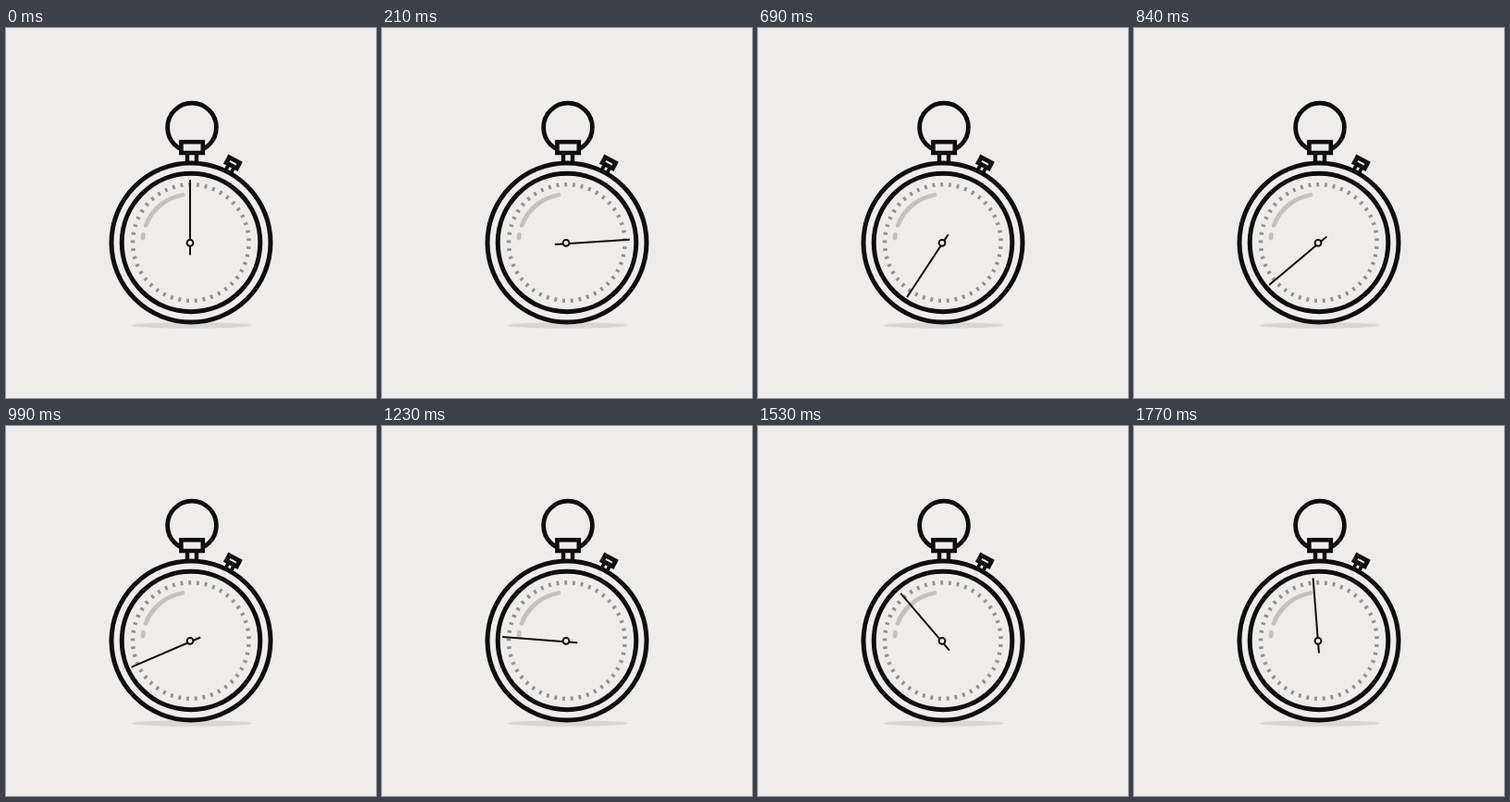
These frames come from a looping animation (400 px wide and 400 px high, 1800 ms). An HTML page with a canvas:

```html
<!DOCTYPE html>
<html lang="en">
<head>
<meta charset="utf-8">
<title>Stopwatch</title>
<style>
  html, body { margin: 0; width: 100%; height: 100%; overflow: hidden; background: #eeedeb; }
  canvas { display: block; width: 400px; height: 400px; }
</style>
</head>
<body>
<canvas id="stage" width="400" height="400"></canvas>
<script>
const ctx = document.getElementById('stage').getContext('2d');
const LOOP = 1800, STEP = 30;
const PAPER = '#eeedeb', INK = '#0e0e0f', TICK = '#929190', GLOSS = '#c3c2c1', SHADE = '#d8d7d5';
const RAD = Math.PI / 180;

// time in ms, hand angle in degrees
const KEYS = [[0, 0], [210, 86.3], [390, 180], [1200, 270], [1800, 360]];

function handAngle(t) {
  const i = KEYS.findIndex(k => k[0] > t);
  const [t0, a0] = KEYS[i - 1], [t1, a1] = KEYS[i];
  return a0 + (a1 - a0) * (t - t0) / (t1 - t0);
}

function pen(color, width, cap = 'butt') {
  ctx.strokeStyle = color;
  ctx.lineWidth = width;
  ctx.lineCap = cap;
}

function arc(x, y, r, from = 0, to = 360) {
  ctx.beginPath();
  ctx.arc(x, y, r, from * RAD, to * RAD);
  ctx.stroke();
}

function line(x1, y1, x2, y2) {
  ctx.beginPath();
  ctx.moveTo(x1, y1);
  ctx.lineTo(x2, y2);
  ctx.stroke();
}

function box(x, y, w, h) {
  ctx.fillStyle = PAPER;
  ctx.fillRect(x, y, w, h);
  ctx.strokeRect(x, y, w, h);
}

function rotated(x, y, deg, paint) {
  ctx.save();
  ctx.translate(x, y);
  ctx.rotate(deg * RAD);
  paint();
  ctx.restore();
}

function drawCrown() {
  pen(INK, 4.8);
  arc(201, 107.5, 26.4);
  pen(INK, 4.4);
  line(196, 136, 196, 147);
  line(206, 136, 206, 147);
  pen(INK, 4.6);
  box(189.4, 123.2, 23.4, 11.8);
}

function drawButton() {
  rotated(245.4, 145.7, 28, () => {
    pen(INK, 3.8);
    line(-3.3, 3, -3.3, 13);
    line(3.3, 3, 3.3, 13);
    pen(INK, 4.8);
    box(-6.4, -3.4, 12.8, 6.8);
  });
}

function drawBody() {
  ctx.fillStyle = SHADE;
  ctx.beginPath();
  ctx.ellipse(200.5, 321.5, 65, 3.2, 0, 0, Math.PI * 2);
  ctx.fill();

  drawCrown();
  drawButton();

  ctx.fillStyle = PAPER;
  pen(INK, 5);
  ctx.beginPath();
  ctx.arc(200, 232, 86, 0, Math.PI * 2);
  ctx.fill();
  ctx.stroke();
  arc(200, 232, 74.8);
}

function drawDial() {
  pen(TICK, 2.8);
  for (let i = 0; i < 45; i++) {
    rotated(199.8, 232, i * 8 - 1, () => line(0, -65, 0, -60.6));
  }
  pen(GLOSS, 4.8, 'round');
  arc(200, 232, 52.3, 201, 260);
  arc(200, 232, 52.3, 185.5, 189.8);
}

function drawHand(deg) {
  pen(INK, 2);
  rotated(199, 233.3, deg, () => line(0, -69, 0, 12.2));
  ctx.fillStyle = PAPER;
  ctx.beginPath();
  ctx.arc(199, 232.3, 3.4, 0, Math.PI * 2);
  ctx.fill();
  ctx.stroke();
}

function frame(now) {
  const t = Math.floor((now - start) % LOOP / STEP) * STEP;
  ctx.fillStyle = PAPER;
  ctx.fillRect(0, 0, 400, 400);
  drawBody();
  drawDial();
  drawHand(handAngle(Math.max(0, t)));
  requestAnimationFrame(frame);
}

const start = performance.now();
frame(start);
</script>
</body>
</html>
```
